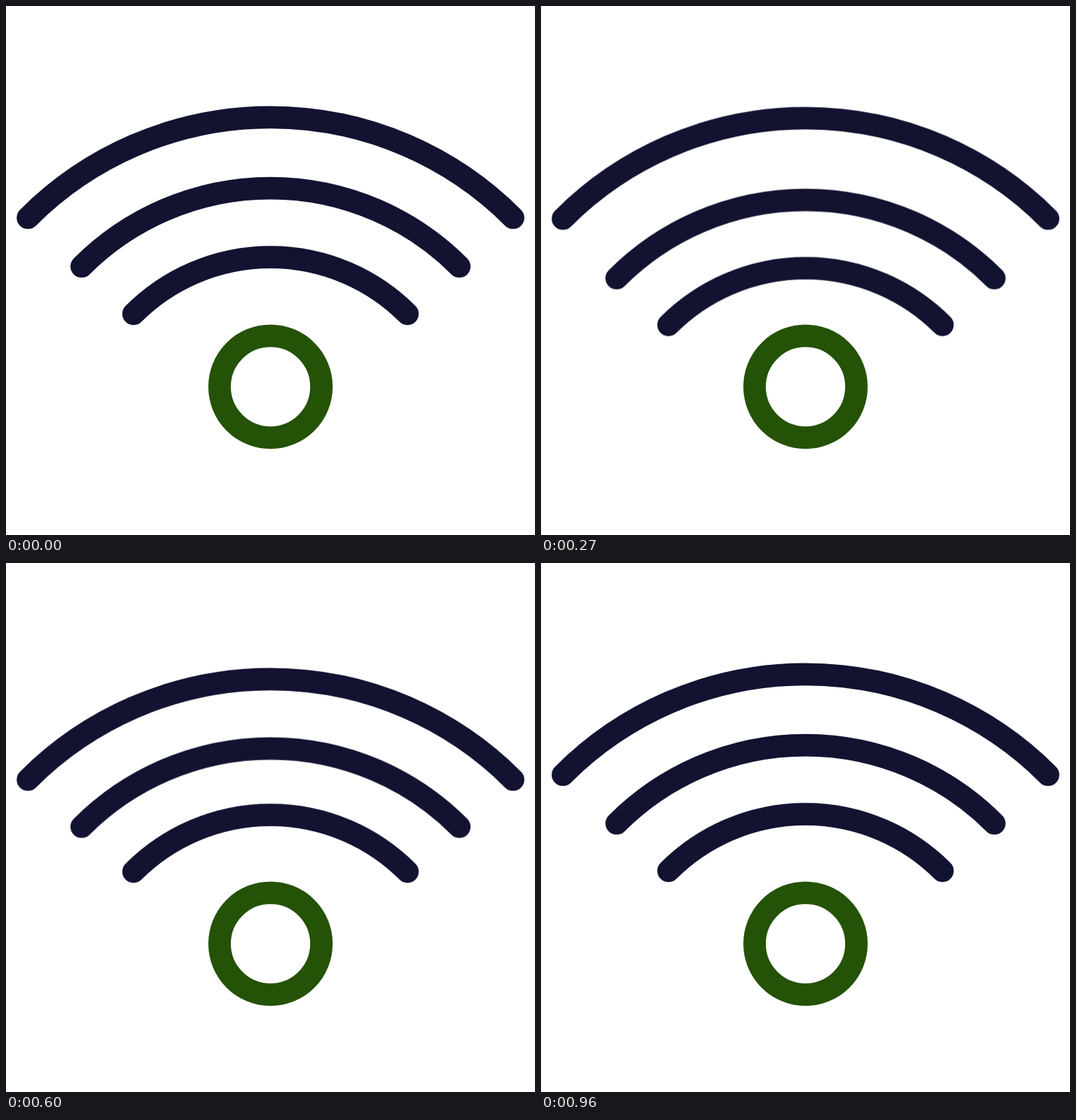
An HTML page for the animation above (3.05 s loop, 748x748 px).

```html
<!DOCTYPE html>
<html lang="en">
<head>
<meta charset="utf-8">
<title>Signal</title>
<style>
  html, body { margin: 0; width: 100%; height: 100%; overflow: hidden; background: #fff; }
  svg { display: block; width: 100%; height: 100%; }
  .arc, .ring { fill: none; stroke-width: 31.8; stroke-linecap: round; }
  .ring { stroke: #245207; }
  .arc { stroke: #121331; animation: bounce 3050ms infinite; }
  .mid { animation-delay: 100ms; }
  .outer { animation-delay: 250ms; }

  /* dip, hold, spring up past rest, rebound, settle */
  @keyframes bounce {
    0% { transform: translateY(0); animation-timing-function: ease-in-out; }
    3.607% { transform: translateY(16.6px); }
    6.557% { transform: translateY(16.6px); animation-timing-function: cubic-bezier(.33, 0, .67, 0); }
    12.459% { transform: translateY(0); animation-timing-function: cubic-bezier(.33, .67, .67, 1); }
    13.77% { transform: translateY(-6.5px); animation-timing-function: cubic-bezier(.37, 0, .63, 1); }
    16.557% { transform: translateY(4.7px); animation-timing-function: cubic-bezier(.33, .67, .67, 1); }
    22.623%, 100% { transform: translateY(0); }
  }
</style>
</head>
<body>
<svg viewBox="0 0 748 748">
  <path class="arc outer" d="M31 299.4A485 485 0 0 1 717 299.4"/>
  <path class="arc mid" d="M107 368.2A377.6 377.6 0 0 1 641 368.2"/>
  <path class="arc inner" d="M180.3 435.3A274 274 0 0 1 567.7 435.3"/>
  <circle class="ring" cx="374" cy="538.3" r="72"/>
</svg>
</body>
</html>
```
